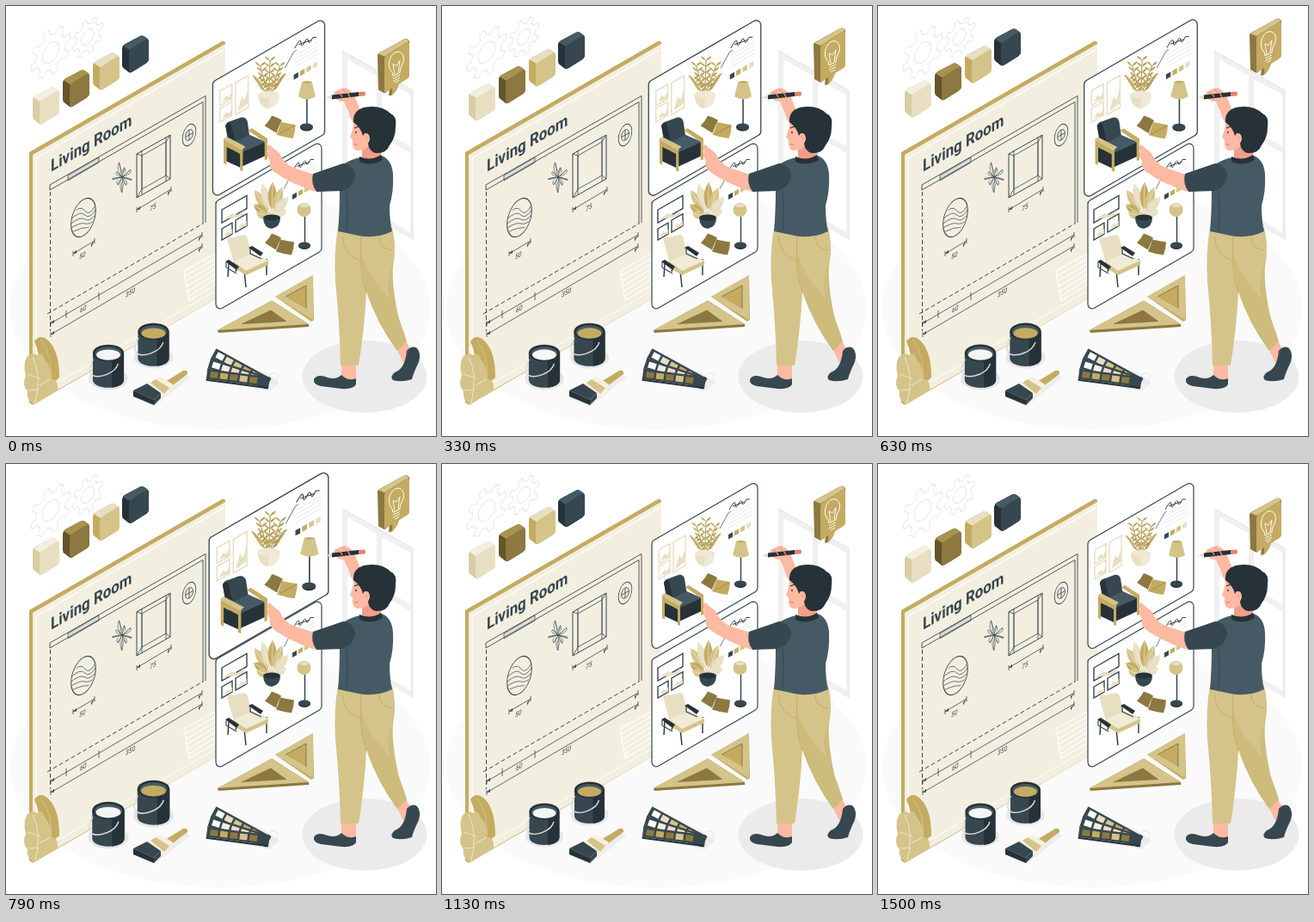
An HTML page with a canvas for the animation above (1.54 s loop, 500x500 px).

```html
<!DOCTYPE html>
<html lang="en">
<head>
<meta charset="utf-8">
<title>Interior design</title>
<style>
html, body { margin: 0; height: 100%; overflow: hidden; background: #fff; }
canvas { display: block; width: 500px; height: 500px; }
</style>
</head>
<body>
<canvas id="stage"></canvas>
<script>
const canvas = document.getElementById('stage');
const ctx = canvas.getContext('2d');
const dpr = window.devicePixelRatio || 1;
canvas.width = canvas.height = 500 * dpr;

const DARK = '#37474f', INK = '#263238', SLATE = '#455a64', GOLD = '#c4ab61', BROWN = '#8c7840',
  BEIGE = '#d4c48a', CREAM = '#e8dfc3', PAPER = '#f3efe0', SKIN = '#fdb9a2', GREY = '#e6e6e6';
const LOOP = 1540, FRAMES = 37;

function path(d, fill, stroke, width = 1) {
  const p = new Path2D(d);
  if (fill) { ctx.fillStyle = fill; ctx.fill(p); }
  if (stroke) { ctx.strokeStyle = stroke; ctx.lineWidth = width; ctx.stroke(p); }
}
const line = (d, color = DARK, width = 1) => path(d, null, color, width);

function oval(x, y, rx, ry, fill, stroke, width = 1) {
  ctx.beginPath();
  ctx.ellipse(x, y, rx, ry, 0, 0, Math.PI * 2);
  if (fill) { ctx.fillStyle = fill; ctx.fill(); }
  if (stroke) { ctx.strokeStyle = stroke; ctx.lineWidth = width; ctx.stroke(); }
}

function at(x, y, draw, scale = 1) {
  ctx.save();
  ctx.translate(x, y);
  ctx.scale(scale, scale);
  draw();
  ctx.restore();
}

// Draws on a wall plane that rises to the right.
function onWall(x, y, draw) {
  ctx.save();
  ctx.transform(0.866, -0.5, 0, 1, x, y);
  draw();
  ctx.restore();
}

function label(text, x, y, font, color = DARK) {
  onWall(x, y, () => {
    ctx.font = font;
    ctx.fillStyle = color;
    ctx.fillText(text, 0, 0);
  });
}

function leaf(x0, y0, x1, y1, w, fill, vein) {
  const mx = (x0 + x1) / 2, my = (y0 + y1) / 2, len = Math.hypot(x1 - x0, y1 - y0);
  const nx = (y0 - y1) / len * w, ny = (x1 - x0) / len * w;
  path(`M${x0} ${y0}Q${mx + nx} ${my + ny} ${x1} ${y1}Q${mx - nx} ${my - ny} ${x0} ${y0}Z`, fill);
  if (vein) line(`M${x0} ${y0}L${x1} ${y1}`, vein, 0.6);
}

function gear(x, y, r, teeth) {
  onWall(x, y, () => {
    ctx.beginPath();
    for (let i = 0; i < teeth; i++) {
      for (const [f, k] of [[0, 0.74], [0.42, 0.74], [0.54, 1], [0.88, 1]]) {
        const a = (i + f) / teeth * Math.PI * 2;
        ctx.lineTo(Math.cos(a) * r * k, Math.sin(a) * r * k);
      }
    }
    ctx.closePath();
    ctx.strokeStyle = GREY;
    ctx.lineWidth = 1;
    ctx.stroke();
    oval(0, 0, r * 0.42, r * 0.42, null, GREY);
  });
}

function backdrop() {
  ctx.fillStyle = '#fff';
  ctx.fillRect(0, 0, 500, 500);
  oval(249, 352, 244, 141, '#fafafa');
  oval(417, 431, 72.5, 42, '#ebebeb');
  gear(52, 54, 27, 8);
  gear(95, 36, 20.5, 8);
  path('M391 52L473 98V272L391 225Z', '#f0f0f0');
  path('M397 62L431 81V142L397 123ZM437 85L470 103V163L437 145ZM397 130L431 149V241L397 222ZM437 152L470 171V263L437 244Z', '#fff');
  line('M391 52L473 98V272', GREY, 1.2);
}

function dimension(x0, y0, x1, y1) {
  line(`M${x0} ${y0}L${x1} ${y1}`, DARK, 0.8);
  for (const [x, y, s] of [[x0, y0, 1], [x1, y1, -1]]) {
    path(`M${x} ${y}l${4 * s} ${-4.2 * s}v${3.6}Z`, DARK);
    line(`M${x} ${y - 3}v6`, DARK, 0.8);
  }
}

function board() {
  path('M27 170L252 40.5L255 42V334L31 464L27 461Z', GOLD);
  path('M31 173L255 44V334L31 463Z', PAPER);
  line('M35 457V177L253 51', '#fff', 1.2);
  line('M35 452L253 326', '#fff', 0.8);
  line('M207 308L243 288V325L213 342ZM208 314L243 294M209 320L243 300M210 326L243 306M211 332L243 312M212 338L243 318', '#fff', 1.2);
  label('Living Room', 52, 193, 'bold 19.5px Roboto, sans-serif');

  path('M72 197L108 176V182L72 203Z', '#dcdcd4', DARK, 0.7);
  line('M51 214V208L232 104.5V252M51 214L229 111.5V253.500', DARK, 0.9);
  ctx.setLineDash([5, 3]);
  line('M51.500 216V378M48 358L229 253', DARK, 1);
  ctx.setLineDash([]);
  dimension(52, 369, 228, 266);
  dimension(52, 382, 228, 279);
  line('M70 354v9M108 333v9', DARK, 0.8);
  dimension(78, 288, 103, 273);
  dimension(152, 237, 192, 213);
  const small = 'italic 8px Roboto, sans-serif';
  label('50', 85, 295, small);
  label('60', 86, 357, small);
  label('350', 139, 339, small);
  label('75', 167, 239, small);

  onWall(90, 246, () => {
    oval(0, 0, 16.5, 21, null, DARK, 1.1);
    ctx.beginPath();
    ctx.arc(0, 0, 16.5, 0, 7);
    ctx.clip();
    for (let i = 0; i < 5; i++) {
      line(`M-18 ${-11 + i * 5}Q-4 ${-18 + i * 7} 2 ${-7 + i * 5}T18 ${-8 + i * 6}`, DARK, 0.7);
    }
  });
  for (let i = 0; i < 9; i++) {
    const a = i * Math.PI * 2 / 9 + 0.2, r = i % 2 ? 12 : 18;
    const x = 135 + Math.cos(a) * r * 0.62, y = 199 + Math.sin(a) * r;
    leaf(135, 199, x, y, 4, PAPER);
    line(`M135 199Q${x + 3} ${(y + 199) / 2} ${x} ${y}Q${x - 4} ${(y + 199) / 2} 135 199L${x} ${y}`, DARK, 0.6);
  }
  path('M152 172L191 150V201L152 223Z', null, DARK, 1);
  path('M158 174L186 158V197L158 213ZM152 172L158 174M191 150L186 158M152 223L158 213M191 201L186 197', null, DARK, 0.8);
  line('M158 168V219M186 153V204', DARK, 0.8);
  onWall(213, 150, () => {
    oval(0, 0, 9, 12, null, DARK, 0.9);
    oval(0, 0, 5, 6, null, DARK, 0.8);
    line('M-5 0H5M0 -6V6', DARK, 0.8);
  });
}

function cardSheet() {
  const pts = [[367, 19], [367, 147], [244, 218], [244, 90]];
  ctx.beginPath();
  ctx.moveTo(305.5, 54.5);
  pts.forEach((p, i) => ctx.arcTo(...p, ...pts[(i + 1) % 4], 5));
  ctx.closePath();
  ctx.fillStyle = '#fff';
  ctx.fill();
  ctx.strokeStyle = DARK;
  ctx.lineWidth = 1.2;
  ctx.stroke();

  line('M323 75L333 57L336 55', DARK, 0.7);
  line('M334 53Q341 40 341 47T345 46Q348 40 349 45T354 41L358 41M338 49L352 44', INK, 0.9);
  for (let i = 0; i < 4; i++) line(`M334 ${61 + i * 4.2}L360 ${46 + i * 4.2}`, GREY, 0.8);
  [DARK, GOLD, BEIGE, CREAM].forEach((c, i) => {
    const x = 333 + i * 7, y = 82 - i * 4;
    path(`M${x} ${y}l5 -2.800v5.500l-5 2.800Z`, c);
  });
}

function picture(x, y, w, h, border) {
  const s = -w * 0.57;
  path(`M${x} ${y}l${w} ${s}v${h}l${-w} ${-s}Z`, '#fff', border, 1.4);
  path(`M${x + 2.5} ${y + h - 4}l${w * 0.3} ${-h * 0.45}l${w * 0.25} ${h * 0.1}l${w * 0.25} ${-h * 0.35}v${h * 0.45}Z`, CREAM);
}

function lamp(top, base, draw) {
  line(`M347.500 ${top}V${base}`, DARK, 1.5);
  oval(347, base + 1, 7, 4, INK);
  oval(347, base, 7, 3.5, DARK);
  draw();
}

function cushions(dy, front) {
  at(0, dy, () => {
    path('M301 138Q306 133 309 127Q315 129 320 132Q317 138 314 146Q307 142 301 138Z', BROWN);
    path('M319 134Q328 136 335 137Q335 144 332 152Q323 151 314 148Q317 141 319 134Z', front);
    line('M317 147Q326 142 334 138', BROWN, 0.6);
  });
}

function upperCard() {
  cardSheet();
  picture(252, 100, 13, 16, CREAM);
  picture(252, 119, 13, 15, CREAM);
  picture(269, 91, 14, 35, CREAM);
  for (const [x, y] of [[296, 72], [307, 66], [318, 72], [293, 87], [319, 85]]) {
    line(`M305.500 106L${x} ${y}`, BROWN, 0.8);
    for (let k = 0.3; k <= 1; k += 0.17) {
      const px = 305.5 + (x - 305.5) * k, py = 106 + (y - 106) * k;
      leaf(px, py, px - 6, py - 5, 2, GOLD);
      leaf(px, py, px + 6, py - 5, 2, '#b59c50');
    }
  }
  path('M294 104Q295 118 305 119Q316 118 317 104Z', CREAM);
  path('M306 106Q316 106 317 104Q315 118 305 119Z', '#f0ead6');
  oval(305.5, 104, 11.5, 4, '#efe8d2');
  lamp(106, 139, () => {
    path('M342 90Q348 88 353 90L357 106Q348 112 338 106Z', BEIGE);
    path('M342 90Q348 88 353 90Q348 93 342 90Z', GOLD);
  });
  cushions(0, GOLD);
  path('M258 138Q259 134 264 133L275 129Q280 128 282 133L285 153L263 162Z', DARK);
  path('M258 138Q260 134 264 136L269 159L262 162Z', INK);
  path('M266 157L284 148L302 156V171L276 183L262 174Z', INK);
  path('M266 157L284 148L302 156L277 167Z', SLATE);
  path('M259 161L274 169V184L259 177Z', INK);
  path('M256 153L277 164V188L274 187V169L259 161V181L256 179Z', GOLD);
  path('M255 153L259 150L280 161L276 165Z', BEIGE);
  path('M283 143L287 141L304 152V175L301 176V156Z', GOLD);
}

function lowerCard() {
  at(0, 137.5, cardSheet);
  picture(251, 237, 29, 15, DARK);
  picture(251, 259, 12, 13, DARK);
  picture(267, 249, 13, 14, DARK);
  const tips = [[289, 214], [298, 207], [310, 205], [321, 211], [328, 222], [288, 231], [291, 241], [326, 237]];
  tips.forEach(([x, y], i) => {
    line(`M309 247L${x} ${y}`, GOLD, 0.8);
    leaf(309 + (x - 309) * 0.2, 245 + (y - 245) * 0.2, x, y, 10, [BEIGE, CREAM, GOLD][i % 3], '#f5f0df');
  });
  path('M299 247Q300 258 309 259Q319 257 319 246Z', DARK);
  oval(309, 246, 10, 3.5, INK);
  lamp(245, 278, () => {
    oval(346.5, 237, 8, 8, BEIGE);
    oval(346.5, 232, 5, 2, CREAM);
  });
  cushions(137.5, BROWN);
  line('M259 299L258 315M277 308L279 327M303 294V313M270 300L267 309', INK, 1.4);
  path('M257 271Q258 267 263 269L277 266Q281 267 281 271L286 290L265 299Z', CREAM);
  path('M264 297L286 287L305 296V301L279 313L264 304Z', BEIGE);
  path('M264 297L286 287L305 296L279 308Z', '#f0ead6');
  path('M255 297L259 295L271 303L268 307Z', INK);
  path('M282 281L286 279L299 287L296 291Z', INK);
  line('M256 298V304L268 311M284 282V288L297 294', DARK, 1.2);
}

function rulers() {
  path('M246 377L309 342.500L352 370V373L247 380Z', BROWN);
  path('M246 377L309 342.500L352 370ZM274 370L326 367L308 354Z', BEIGE);
  line('M274 370L308 354L326 367', BROWN, 1);
  path('M313 338L357 313L358 365L355 367Z', GOLD);
  path('M313 338L357 313V365ZM325 338L349 352V325Z', BEIGE);
  line('M325 338L349 325V352', BROWN, 1);
}

// Centred on the middle of the tin.
function tin(paint) {
  oval(0, 14, 22, 12.5, GREY);
  path('M-17.500 -15V15C-17.500 27 17.500 27 17.500 15V-15Z', DARK);
  path('M4 24Q17.500 22 17.500 15V-15L4 -8Z', INK);
  oval(0, -15, 17.5, 9.5, INK);
  oval(0, -14.5, 15, 7.6, SLATE);
  oval(0, -13, 13.5, 6, paint);
  line('M-17 -8Q-24 6 -18 10C-10 14 8 8 11 -3', '#dcdcdc', 1.4);
}

function brush() {
  path('M147 452L172 466L214 432L206 426Z', '#ededed');
  path('M185 437L206 424Q212 423 211 428L191 443Z', GOLD);
  path('M164 440L180 431L194 440L191 450L178 456Z', '#f5f0df');
  path('M168 438L174 434L190 444L184 451Z', BEIGE);
  path('M148 447L164 439L180 450L172 458Z', DARK);
  path('M148 447L172 458V464L148 454Z', INK);
  path('M172 458L180 450V456L172 464Z', DARK);
}

function fan() {
  path('M230 433L306 448L318 438L300 425Z', '#ededed');
  oval(311, 432, 5, 5.5, null, GREY);
  const strips = [
    [0.5, ['#fff', CREAM, BEIGE, GOLD, BEIGE]],
    [0.31, ['#fff', PAPER, '#f6d5cc', CREAM, BEIGE]],
    [0.13, [BROWN, GOLD, BROWN, BEIGE, BROWN]]
  ];
  for (const [angle, colors] of strips) {
    ctx.save();
    ctx.translate(303, 437);
    ctx.rotate(angle);
    path('M-70 -6H3V6H-70Z', DARK);
    path('M-70 6H3V8H-70Z', INK);
    colors.forEach((c, i) => {
      ctx.fillStyle = c;
      ctx.fillRect(-66 + i * 11.5, -3.5, 9, 7);
    });
    ctx.restore();
  }
}

function person() {
  path('M454 398L465 389L472 403L462 415Z', SKIN);
  path('M466 401Q472 394 478 398Q483 404 480 414Q474 426 472 434Q460 438 450 435Q446 431 452 426Q464 422 466 401Z', DARK);
  path('M390 415H407V433Q398 439 390 432Z', SKIN);
  path('M358 434Q362 427 374 432Q384 435 390 429Q398 437 407 433V440Q404 446 390 445L366 442Q357 440 358 434Z', DARK);
  path('M386 258H449Q456 285 447 315Q441 328 446 340Q459 365 466 390L455 401Q432 370 419 332Q417 375 410 418H389Q388 370 383 320Q381 285 386 258Z', BEIGE);
  path('M419 332Q411 305 413 284Q417 310 446 340Q440 325 450 300Q448 330 459 372L466 390L455 401Q432 370 419 332Z', '#cdbc7c');
  line('M391 268Q393 290 412 296M413 268Q410 310 419 333M434 268Q434 282 449 284', GOLD, 0.9);

  path('M381 103Q385 96 394 95Q403 98 406 106L412 122Q416 132 409 142L403 135Q397 120 393 111Q385 112 381 103Z', SKIN);
  path('M372 106.500L379 103.500V108.500Z', CREAM);
  path('M379 103.500L410 100V105L379 108.500Z', INK);
  path('M410 100L417 99.500Q419 102 417 104.500L410 105Z', '#e8806c');
  line('M382 100Q389 100 391 106M391 97Q398 100 400 106', '#f29a84', 1.2);

  path('M412 176Q424 182 437 174Q449 179 450 196Q451 216 446 232Q446 250 449 262Q430 271 410 267Q396 264 386 262Q388 240 388 214L392 184Q402 178 412 176Z', SLATE);
  path('M358 196L334 188Q322 182 318 171Q311 166 306 161Q302 163 305 169Q302 173 307 180Q305 188 312 193Q330 206 360 216Z', SKIN);
  path('M357 195L392 183Q406 186 406 198Q403 212 390 215L361 216Q354 206 357 195Z', DARK);
  line('M396 214Q398 235 396 262', DARK, 1);
  path('M414 156L436 156V177Q424 183 414 176Z', '#f29e88');
  path('M405 132Q403 146 400 152L403 156Q402 166 408 168Q418 169 424 160L432 132Z', SKIN);
  path('M411 175Q424 181 436 173L438 179Q424 187 411 181Z', INK);
  path('M404 135Q403 122 416 118Q436 114 447 125Q455 128 453 141Q453 153 446 162Q442 172 430 171Q422 169 421 160Q424 148 417 148L415 151Q413 142 404 135Z', INK);
  oval(419, 154, 4, 6, SKIN);
  line('M417 152Q420 151 420 156', '#e98f79', 0.8);
  line('M405 142L410 140', INK, 1.2);
  oval(407, 147, 0.8, 1.3, INK);
  line('M405 161L409 161', '#c96f5c', 0.9);
}

function foliage() {
  path('M33 390Q40 380 50 390Q62 402 62 432L36 455Q46 420 33 390Z', GOLD);
  line('M40 388Q56 408 52 442', BEIGE, 0.9);
  path('M25 407Q31 402 36 406Q42 401 45 411Q54 420 52 434Q61 433 60 447L33 463Q23 458 25 448Q18 440 23 430Q19 416 25 407Z', BEIGE);
  line('M31 408Q42 430 34 461M25 428L40 433M26 447L38 446M52 434L39 441', '#f0e8cd', 0.9);
}

function swatch(x, y, side, face, top) {
  at(x, y, () => {
    path('M0 15Q0 12 3 10L20 1Q23 -1 26 1L30 4Q31 5 31 8V27Q31 30 28 32L12 42Q9 44 7 42L2 38Q0 37 0 34Z', side);
    path('M1 12L3 10L20 1Q23 -1 26 1L30 4L9 17Z', top);
    path('M8 20Q8 17 11 15L27 5Q31 3 31 8V27Q31 30 28 32L12 42Q8 44 8 40Z', face);
  });
}

function swatches(lift) {
  swatch(31, 95 - lift, '#d9cda5', CREAM, '#f3eede');
  swatch(66, 75 - lift, '#63542a', BROWN, '#a8924f');
  swatch(101, 55 - lift, GOLD, BEIGE, CREAM);
  swatch(135, 35 - lift, INK, DARK, SLATE);
}

function ideaSign(lift) {
  at(0, -lift, () => {
    path('M432 59Q432 57 434 56L463 40Q465 39 467 40L469 42V83L457 92L449 105L445 106L446 98L440 103L433 99Z', BROWN);
    path('M433 57L463 40Q465 39 469 42L440 60Z', BEIGE);
    path('M440 63Q440 61 442 59L466 44Q469 42 469 46V82Q469 84 467 86L457 92Q455 101 448 106Q450 102 449 97L442 102Q440 103 440 100Z', GOLD);
    path('M450 83Q450 79 447 76C443 69 447 57 454 55C462 53 465 64 460 71Q458 75 458 79Z', null, '#fff', 1);
    line('M450 86L458 82M450 89L458 85M452 91L457 88M452 81L450 69L454 71L458 65L456 79', '#fff', 0.9);
  });
}

// Double pulse: 0 at rest, 1 at each peak.
function pulse(p) {
  const tent = (from, peak, to) => Math.max(0, Math.min((p - from) / (peak - from), (to - p) / (to - peak)));
  return tent(0, 0.1, 0.3) + tent(0.4, 0.5, 0.6);
}

function render(ms) {
  const step = Math.floor((ms % LOOP + 3) / LOOP * FRAMES) + 1;
  const p = step % FRAMES / FRAMES;
  const rise = 1 - Math.abs(1 - 2 * p);
  const beat = pulse(p);
  ctx.setTransform(dpr, 0, 0, dpr, 0, 0);
  backdrop();
  board();
  lowerCard();
  at(305.5, 118.5, () => {
    ctx.translate(-305.5, -118.5);
    upperCard();
  }, 1 + 0.215 * beat);
  rulers();
  at(171.5, 394, () => tin(GOLD), 1 + 0.12 * beat);
  at(119, 419, () => tin('#f5f5f5'), 1 + 0.12 * beat);
  brush();
  fan();
  person();
  foliage();
  swatches(9.7 * rise);
  ideaSign(29 * rise);
}

const start = performance.now();
function tick() {
  render(performance.now() - start);
  requestAnimationFrame(tick);
}
tick();
</script>
</body>
</html>
```
